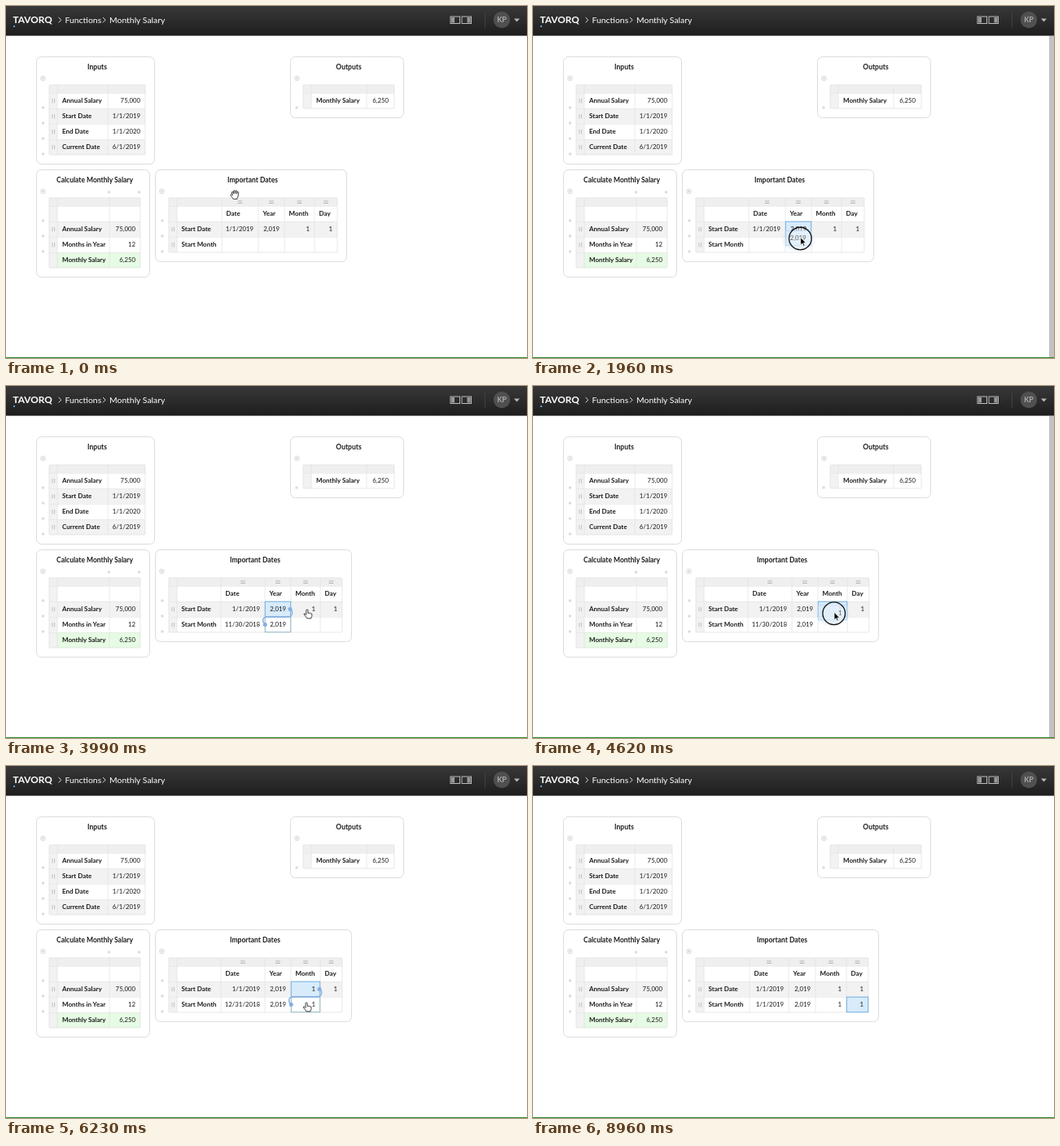
Recreate the animation shown at these times as an HTML page. Size 640 by 433 pixels, loop 9730 ms.

```html
<!DOCTYPE html>
<html lang="en">
<head>
<meta charset="utf-8">
<title>Monthly Salary</title>
<style>
  html, body { margin: 0; width: 100%; height: 100%; overflow: hidden; background: #fff; }
  svg { display: block; width: 640px; height: 433px; }
  text { font: 400 7.8px Lato, "Open Sans", sans-serif; fill: #1c1c1c; }
  .b { font-weight: 700; font-size: 8px; }
  .title { font-weight: 700; font-size: 8.5px; text-anchor: middle; }
  .end { text-anchor: end; }
  .crumb { font-size: 10.4px; fill: #fff; }
  .brand { font-size: 11.8px; font-weight: 700; fill: #fff; }
  .user { font-size: 9px; font-weight: 700; fill: #aaa; text-anchor: middle; }
</style>
</head>
<body>
<svg viewBox="0 0 640 433">
  <defs>
    <linearGradient id="bar" x2="0" y2="1">
      <stop offset="0" stop-color="#383838"/><stop offset="1" stop-color="#1e1e1e"/>
    </linearGradient>
    <radialGradient id="glow">
      <stop offset=".4" stop-color="#a9cdf0" stop-opacity=".55"/><stop offset="1" stop-color="#a9cdf0" stop-opacity="0"/>
    </radialGradient>
    <linearGradient id="drop" x2="0" y2="1">
      <stop offset=".4" stop-color="#fbf3e6"/><stop offset="1" stop-color="#f0dcc0"/>
    </linearGradient>
  </defs>
  <g id="page"></g>
  <g id="live"></g>
</svg>
<script>
const LOOP = 9730, STEP = 70;
const GREY = '#f2f2f2', LINE = '#e4e4e4', BLUE = '#d7ebfb', EDGE = '#73aee2', ROW = 19;

const rect = (x, y, w, h, fill, stroke = 'none', r = 0, extra = '') =>
  `<rect x="${x}" y="${y}" width="${w}" height="${h}" rx="${r}" fill="${fill}" stroke="${stroke}" ${extra}/>`;
const text = (s, x, y, cls = '') => `<text x="${x}" y="${y}" class="${cls}">${s}</text>`;
const path = (d, stroke, width = 1, fill = 'none', extra = '') =>
  `<path d="${d}" stroke="${stroke}" stroke-width="${width}" fill="${fill}" stroke-linejoin="round" ${extra}/>`;
const dot = (x, y, r, fill, stroke = 'none', width = 1) =>
  `<circle cx="${x}" cy="${y}" r="${r}" fill="${fill}" stroke="${stroke}" stroke-width="${width}"/>`;

function card(x, y, right, bottom, title) {
  const add = [x + 8.5, y + 27];
  return rect(x + .5, y + .5, right - x - 1, bottom - y - 1, '#fff', '#dcdcdc', 6) +
    text(title, (x + right) / 2 + 2, y + 15.5, 'title') +
    dot(...add, 2.8, '#fff', '#ccc', .8) +
    path(`M${add[0] - 1.3} ${add[1]}h2.6m-1.3-1.3v2.6`, '#bbb', .7);
}

// edges: handle start, label start, then the right side of every column
function grid(edges, top, fills, grips) {
  const x = edges[0], w = edges.at(-1) - x, h = 10 + fills.length * ROW;
  let out = rect(x, top, w, 10, '#efefef');
  fills.forEach((f, i) => {
    const y = top + 10 + i * ROW;
    out += rect(x, y, w, ROW, f) + rect(x, y, 10, ROW, GREY) + rect(x, y, w, .6, LINE);
    if (grips.includes(i)) out += path(`M${x + 4} ${y + 7}v5.4m2.6-5.4v5.4`, '#b4b4b4', .8);
  });
  edges.slice(1, -1).forEach(e => out += rect(e - .3, top, .7, h, '#e2e2e2'));
  return out + rect(x, top, w, h, 'none', '#dedede', 1, 'stroke-width=".7"');
}

const pair = (label, value, x, right, mid) =>
  text(label, x, mid + 2.8, 'b') + text(value, right, mid + 2.8, 'end');
const dots = (x, ys) => ys.map(y => dot(x, y, 1.8, '#dcdcdc')).join('');

function page() {
  let out = rect(0, 0, 640, 36.6, 'url(#bar)') + rect(0, 432, 640, 1, '#2a8a2a');
  out += text('TAVORQ', 8.5, 21.3, 'brand') + rect(9, 24, 2, 2, '#5b9bd5') +
    text('Functions', 72.5, 20.8, 'crumb') + text('Monthly Salary', 127, 20.8, 'crumb') +
    path('M64.6 14l3.2 3.2-3.2 3.2M119 14l3.2 3.2-3.2 3.2', '#ddd') +
    rect(546, 13, 11.5, 8.5, 'none', '#bbb') + rect(547, 14, 4, 6.5, '#999') +
    rect(560, 13, 11.5, 8.5, 'none', '#bbb') + rect(566.5, 14, 4, 6.5, '#999') +
    rect(588, 8, 1, 19, '#404040') + dot(609, 17, 10.2, '#505050') +
    text('KP', 609, 20.2, 'user') + path('M624 15.4h7l-3.5 4z', 'none', 0, '#b5b5b5');

  out += card(37, 62, 183, 195, 'Inputs') +
    grid([53, 63, 125, 171], 97, ['#fff', GREY, '#fff', GREY], [0, 1, 2, 3]) +
    dots(45.5, [125, 144, 163, 182]);
  [['Annual Salary', '75,000'], ['Start Date', '1/1/2019'], ['End Date', '1/1/2020'], ['Current Date', '6/1/2019']]
    .forEach(([a, b], i) => out += pair(a, b, 69, 165, 116.5 + i * ROW));

  out += card(349, 62, 489, 138, 'Outputs') + grid([365, 375, 443, 477], 97, ['#fff'], []) +
    dots(357, [125]) + pair('Monthly Salary', '6,250', 381, 470, 116.5);

  out += card(37, 201, 177, 334, 'Calculate Monthly Salary') +
    grid([53, 63, 127, 165], 236, ['#fff', GREY, '#fff', '#e6fbe3'], [1, 2]) +
    dots(45.5, [264, 283, 302]) + dots(126.5, [229]) + dots(163.5, [229]);
  [['Annual Salary', '75,000'], ['Months in Year', '12'], ['Monthly Salary', '6,250']]
    .forEach(([a, b], i) => out += pair(a, b, 69, 159, 274.5 + i * ROW));
  return out;
}

// Important Dates: column edges for each layout
const NARROW = [265, 310, 342, 379, 407], WIDE = [264, 318, 350, 386, 413], FINAL = [266, 314, 347, 385, 412];
const HEADS = ['Date', 'Year', 'Month', 'Day'], ROW1 = ['1/1/2019', '2,019', '1', '1'];
const TOP = [265, 284];

const cell = (c, i, row, fill, stroke) =>
  rect(c[i] + .3, TOP[row] + .2, c[i + 1] - c[i] - .6, ROW - .4, fill, stroke);

function link(c, i) {
  const l = c[i] + .3, r = c[i + 1] - 1;
  return cell(c, i, 1, 'none', '#93b9c4') +
    path(`M${r} 274.5C${r + 4} 277 ${r + 4} 284 ${r - 4} 284H${l + 3}C${l - 4} 284 ${l - 4} 290 ${l} 293.5`, '#8db3e8', 1.5) +
    dot(r, 274.5, 2.5, '#86ade6') + dot(l, 293.5, 2.5, '#86ade6');
}

function dates(t) {
  const c = t < 3220 ? NARROW : t < 8750 ? WIDE : FINAL;
  const row2 = [
    t < 3220 ? '' : t < 5810 ? '11/30/2018' : t < 8750 ? '12/31/2018' : '1/1/2019',
    t < 3220 ? '' : '2,019',
    t < 5810 ? '' : '1',
    t < 8750 ? '' : '1'
  ];
  const source = t < 1400 ? 0 : t < 4200 ? 1 : t < 6930 ? 2 : 0;
  let out = card(183, 201, t < 3220 ? 419 : 425, 315, 'Important Dates') +
    dots(192, [264, 283, 302]) + grid([200, 210, ...c], 236, ['#fff', GREY, '#fff'], [1, 2]);

  if (source) out += cell(c, source, 0, BLUE, EDGE);
  if (t >= 6930 && t < 7700 || t >= 8890) out += cell(c, 3, 1, BLUE, EDGE);
  if (t >= 7700 && t < 8750) {
    out += cell(c, 3, 1, '#fff', EDGE);
    if (t >= 7910) out += text('1', c[3] + 6, 296.3);
    if (t < 8260) out += rect(396.8, 288, .8, 11, '#333');
  }
  out += text('Start Date', 215.5, 277.3, 'b') + text('Start Month', 215.5, 296.3, 'b');
  HEADS.forEach((head, i) => {
    const mid = (c[i] + c[i + 1]) / 2, right = c[i + 1] - 6;
    out += path(`M${mid - 2.8} 240h5.6m-5.6 2.5h5.6`, '#aaa', .9) +
      text(head, c[i] + 5.5, 258.3, 'b') +
      text(ROW1[i], right, 277.3, 'end') + text(row2[i], right, 296.3, 'end');
  });
  if (t >= 3220 && t < 4200) out += link(c, 1);
  if (t >= 5810 && t < 6930) out += link(c, 2);
  return out;
}

// pointer hot spot: time, x, y
const WAY = [
  [0, 280, 229], [350, 337, 267], [700, 337, 267], [1050, 329, 275], [1400, 329, 275],
  [2310, 328, 291.5], [3360, 328, 291.5], [3990, 370, 275.5], [4410, 370, 275.5],
  [4970, 369, 289], [5180, 369, 291.5], [6200, 369, 291.5], [6930, 401, 295], [LOOP, 401, 295]
];
function pointer(t) {
  const n = WAY.findIndex(k => k[0] > t), a = WAY[n - 1], b = WAY[n];
  const u = (t - a[0]) / (b[0] - a[0]), e = u * u * (3 - 2 * u);
  return [a[1] + (b[1] - a[1]) * e, a[2] + (b[2] - a[2]) * e];
}

const HAND = 'M-1.2 5.5V.6a1.1 1.1 0 0 1 2.2 0V4q1-.9 1.8.1q1-.6 1.6.3q1.3-.4 1.4.9V7q0 1.3-.9 2.4v1H-.4v-.8Q-2.6 7.5-3.8 5.6q-.4-1.3.8-1q.9.3 1.8 1.4z';
const GRAB = 'M-2.6.6L-3.8-2.2q-.2-1.2.9-1.2q.7.1.9.9l.5 1.4L-1.6-4q.1-1.1.9-1.1q.9 0 1 1L.4-1.2.7-4q.2-1 1-1q.9.1.9 1.1L2.4-1 3-2.8q.4-.9 1.1-.7q.8.3.6 1.2L4 2q-.2 1.5-1 2.4v1H-1.8Q-3.4 3.4-5 1.2q-.5-1 .5-1.2q1 0 1.9 1z';
const ARROW = 'M0 0V9.5L2.2 7.4 3.7 10.8 5.2 10.1 3.8 6.9H6.7Z';

const DRAGS = [
  { press: 1400, lift: 1540, drop: 2590, clear: 2870, col: 1, cols: NARROW, y: 275, value: '2,019' },
  { press: 4200, lift: 4480, drop: 5460, clear: 5600, col: 2, cols: WIDE, y: 275.5, value: '1' }
];

function drag(d, t, x, y) {
  const l = d.cols[d.col], r = d.cols[d.col + 1], dy = y - d.y;
  let out = '';
  if (t >= d.lift && t < d.clear) {
    const fade = Math.min(1, (d.clear - t) / (d.clear - d.drop));
    out += rect(634, 37, 6, 395, '#c2c2c2', 'none', 0, `opacity="${fade}"`);
  }
  if (t >= d.lift && t < d.drop) {
    if (dy > 12) out += rect(l + .5, 284.5, r - l - 1, 18.5, 'url(#drop)');
    out += `<ellipse cx="${(l + r) / 2}" cy="${y + 2}" rx="22" ry="15" fill="url(#glow)"/>` +
      rect(l + .5, 265.5 + dy, r - l - 1, 18, '#dcecfa', '#b4d3f0', 0, 'opacity=".8"') +
      text(d.value, r - 6.5, 277.3 + dy, 'end');
  }
  if (t >= d.press && t < d.drop) {
    const grow = 4 * Math.max(0, 1 - (t - d.press) / 140);
    out += dot(x, y, 13.8 + grow, 'rgba(255,255,255,.3)', '#111', 1.3);
  }
  return out;
}

function live(t) {
  const [x, y] = pointer(t);
  let out = dates(t), arrow = false;
  for (const d of DRAGS) {
    out += drag(d, t, x, y);
    arrow ||= t >= d.lift && t < d.drop;
  }
  if (t >= 8540) return out;
  const at = (dx, dy) => `transform="translate(${x + dx} ${y + dy})"`;
  if (arrow) return out + path(ARROW, '#fff', .8, '#000', at(.3, -1.5));
  return out + (y < 246
    ? path(GRAB, '#111', .8, '#fff', at(1, 3))
    : path(HAND, '#111', .8, '#fff', at(0, 0)));
}

const layer = document.getElementById('live');
document.getElementById('page').innerHTML = page();
const start = performance.now();
let shown = -1;
function tick() {
  const t = Math.floor((performance.now() - start) % LOOP / STEP) * STEP;
  if (t !== shown) layer.innerHTML = live(shown = t);
  requestAnimationFrame(tick);
}
tick();
</script>
</body>
</html>
```
